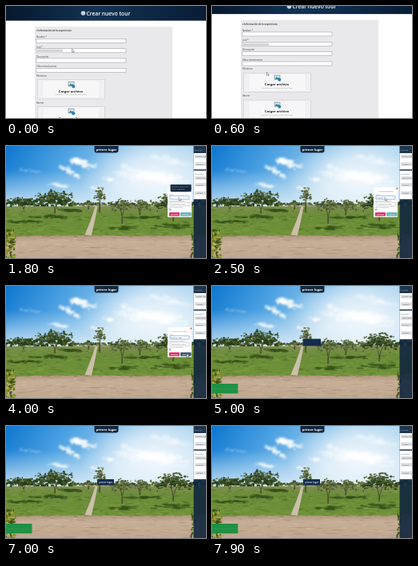
An HTML page that plays this animation: 250x141 px, repeating every 8 s.

```html
<!DOCTYPE html>
<html lang="es">
<head>
<meta charset="utf-8">
<title>Crear nuevo tour</title>
<style>
html, body { margin: 0; width: 100%; height: 100%; overflow: hidden; background: #fff; }
svg { display: block; width: 100vw; height: 100vh; }
text { font-family: "Open Sans", "Noto Sans", sans-serif; }
</style>
</head>
<body>
<svg id="stage" viewBox="0 0 250 141">
  <defs>
    <linearGradient id="bar"><stop offset="0" stop-color="#07182d"/><stop offset=".45" stop-color="#123354"/><stop offset="1" stop-color="#081c35"/></linearGradient>
    <linearGradient id="sky" gradientUnits="userSpaceOnUse" x1="0" y1="0" x2="125" y2="85"><stop offset="0" stop-color="#0d76cf"/><stop offset=".45" stop-color="#4da2e2"/><stop offset="1" stop-color="#a9d2ee"/></linearGradient>
    <linearGradient id="horizon" x1="0" y1="0" x2="0" y2="1"><stop offset="0" stop-color="#e4f1f9" stop-opacity="0"/><stop offset="1" stop-color="#e4f1f9" stop-opacity=".85"/></linearGradient>
    <radialGradient id="glow"><stop offset="0" stop-color="#fff" stop-opacity=".85"/><stop offset=".5" stop-color="#f4f9fd" stop-opacity=".6"/><stop offset="1" stop-color="#e8f3fb" stop-opacity="0"/></radialGradient>
    <linearGradient id="grass" x1="0" y1="0" x2="0" y2="1"><stop offset="0" stop-color="#7d8f50"/><stop offset=".3" stop-color="#6a8c38"/><stop offset="1" stop-color="#6f9238"/></linearGradient>
    <linearGradient id="sand" x1="0" y1="0" x2="0" y2="1"><stop offset="0" stop-color="#ae957b"/><stop offset=".3" stop-color="#c6ae97"/><stop offset="1" stop-color="#c0a78f"/></linearGradient>
    <filter id="wisp" x="-20%" y="-20%" width="140%" height="140%"><feGaussianBlur stdDeviation="1"/></filter>
    <filter id="haze"><feGaussianBlur stdDeviation=".6"/></filter>
    <path id="arrow" d="M0 0v4.2l1-.9.7 1.6.7-.3-.7-1.5h1.3z" fill="#fff" stroke="#222" stroke-width=".35"/>
  </defs>
  <g id="form"></g>
  <g id="tour">
    <g id="photo"></g>
    <g id="side"></g>
    <g id="popup"></g>
    <g id="spot"></g>
    <g id="toast"></g>
    <g id="title"></g>
  </g>
</svg>
<script>
const NS = 'http://www.w3.org/2000/svg';
const $ = id => document.getElementById(id);

function add(parent, tag, attrs, content) {
  const el = document.createElementNS(NS, tag);
  for (const k in attrs) el.setAttribute(k, attrs[k]);
  if (content) el.textContent = content;
  parent.appendChild(el);
  return el;
}
const box = (p, x, y, width, height, fill, more) => add(p, 'rect', { x, y, width, height, fill, ...more });
const label = (p, x, y, size, fill, str, more) => add(p, 'text', { x, y, 'font-size': size, fill, ...more }, str);
const blob = (p, cx, cy, rx, ry, fill, opacity = 1) => add(p, 'ellipse', { cx, cy, rx, ry, fill, opacity });
const MID = { 'text-anchor': 'middle' };
const BOLD = { ...MID, 'font-weight': 700 };

let seed = 17;
const rnd = () => (seed = (seed * 16807) % 2147483647) / 2147483647;
const spread = () => rnd() + rnd() - 1;
const pick = list => list[Math.floor(rnd() * list.length)];
const ramp = (t, a, b) => Math.min(1, Math.max(0, (t - a) / (b - a)));
const ease = u => u * u * (3 - 2 * u);

// Form page
const form = $('form');
box(form, 0, 0, 250, 141, '#fff');
const page = add(form, 'g');
box(page, 0, 0, 250, 18.5, 'url(#bar)');
add(page, 'circle', { cx: 96.5, cy: 9, r: 2.8, fill: '#c5d3e0' });
label(page, 100.5, 11.5, 6.7, '#fff', 'Crear nuevo tour', { 'font-weight': 600 });
box(page, 36, 26, 172, 150, '#e9e9ec');
label(page, 38, 32.2, 2.9, '#333', '▾ Información de la experiencia', { 'font-weight': 600 });

function field(y, name) {
  label(page, 38, y - 2.7, 2.8, '#444', name);
  box(page, 38, y - 1.4, 112, 5, '#fff', { stroke: '#8d8d92', 'stroke-width': .45 });
}
field(42.7, 'Nombre *');
field(55.2, 'Link *');
box(page, 38.3, 54.1, 33, 4.4, '#e2e2e5');
label(page, 39, 57.3, 2.4, '#888', 'tours.ejemplo.mx/recorrido/');
field(67.4, 'Descripción');
field(79.8, 'Video introductorio');

function uploader(y, name) {
  label(page, 38, y - 4, 2.8, '#444', name);
  box(page, 39.5, y, 84, 24.5, '#f1f1f3', { stroke: '#c6c6cb', 'stroke-width': .5 });
  box(page, 46, y + 1.5, 71, 21.5, '#f7f7f8', { stroke: '#dedee2', 'stroke-width': .3 });
  box(page, 78, y + 3, 7, 5.4, '#d6e4ea', { stroke: '#58727f', 'stroke-width': .5 });
  add(page, 'path', { d: `M78.5 ${y + 8}l2.2-3 1.5 1.6 1-1 1.4 2.4z`, fill: '#2b8c83' });
  add(page, 'circle', { cx: 84.3, cy: y + 8.7, r: 2, fill: '#297bb5' });
  label(page, 81, y + 16, 4.2, '#222', 'Cargar archivo', BOLD);
  label(page, 81, y + 19.8, 2.3, '#888', 'Formatos: PNG, JPG, JPEG, Máx: 5MB', MID);
}
uploader(92.5, 'Miniatura');
uploader(126.5, 'Banner');

function button(p, x, y, w, h, fill, str, size) {
  const r = box(p, x, y, w, h, fill, { rx: .6 });
  label(p, x + w / 2, y + h / 2 + size * .36, size, '#fff', str, BOLD);
  return r;
}
button(page, 33, 158.8, 22, 5, '#16708f', 'Guardar', 3);
button(page, 56, 158.8, 24, 5, '#dc2f62', 'Cancelar', 3);
const formCursor = add(form, 'use', { href: '#arrow' });

// Panorama sky
const photo = $('photo');
box(photo, 0, 0, 250, 141, 'url(#sky)');
box(photo, 0, 30, 250, 48, 'url(#horizon)');
add(photo, 'ellipse', { cx: 185, cy: 40, rx: 95, ry: 52, fill: 'url(#glow)' });
const clouds = add(photo, 'g', { filter: 'url(#wisp)' });

// Streaks run down to the right around each centre.
function cloud(x, y, w, h, count, opacity) {
  while (count--) {
    const u = spread();
    blob(clouds, x + u * w, y + u * h * .7 + spread() * h * .6, 1 + rnd() * w * .22, .5 + rnd() * h * .3, '#fff', opacity * (.5 + rnd() * .5));
  }
}
cloud(97, 23, 19, 9, 34, .75);
cloud(78, 31, 14, 7, 22, .65);
cloud(129, 42, 9, 4, 16, .8);
cloud(113, 53, 10, 3, 14, .65);
cloud(66, 49, 18, 4, 18, .55);
cloud(30, 31, 14, 3, 9, .3);
cloud(185, 38, 52, 14, 55, .45);
cloud(205, 18, 34, 8, 22, .3);

// Ground
const GREENS = ['#33451f', '#465a2a', '#5b6f35', '#263a19'];
const PALE = ['#4c5b32', '#657345', '#3a4a27', '#7b8650'];
const far = add(photo, 'g');
for (let x = -2; x < 252; x += 1.5) {
  const h = x < 88 ? 8 : x > 165 ? 7 : 4;
  blob(far, x, 76 - rnd() * h, 1 + rnd() * 2, .8 + rnd() * h * .28, pick(GREENS));
}
box(photo, 0, 76, 250, 39, 'url(#grass)');
box(photo, 84, 74.6, 88, 1.6, '#b9b397', { opacity: .7 });
const lawn = add(photo, 'g', { filter: 'url(#haze)' });
for (let i = 0; i < 420; i++) {
  const depth = rnd();
  blob(lawn, rnd() * 240, 77 + depth * 36, 1 + rnd() * (2 + depth * 4), .3 + rnd() * .7,
    pick(['#8aa04a', '#4b6d25', '#789a3f', '#597a2d']), .5);
}
[[55, 89, 26, 2.6], [22, 95, 24, 2.4], [145, 103, 19, 2.6], [207, 101, 26, 3.6], [172, 90, 23, 1.8], [80, 81, 20, 1.4]]
  .forEach(([x, y, w, h]) => {
    for (let i = 0; i < 26; i++) blob(lawn, x + spread() * w, y + spread() * h, 2 + rnd() * 4, .5 + rnd(), '#35511c', .55);
  });
add(photo, 'path', { d: 'M111.5 76h3Q112 91 106.5 114h-9Q107 92 111.5 76z', fill: '#cbbfaa' });
add(photo, 'path', { d: 'M0 114Q60 112 125 112.8T250 111.5V141H0z', fill: 'url(#sand)' });
const dirt = add(photo, 'g', { filter: 'url(#haze)' });
for (let i = 0; i < 60; i++)
  blob(dirt, rnd() * 240, 112 + rnd() * 2, 1 + rnd() * 3, .4 + rnd() * .5, pick(['#7d8245', '#a48c6f']), .6);
for (let i = 0; i < 180; i++)
  blob(dirt, rnd() * 250, 115 + rnd() * 26, 1 + rnd() * 7, .3 + rnd() * .5, pick(['#a48b72', '#d6c3ae', '#b59d84']), .45);

// Leaves get darker toward the underside of each crown.
function tree(x, y, w, h, base, count, tones) {
  add(photo, 'path', {
    d: `M${x} ${base}Q${x + 1} ${y + h} ${x - w * .35} ${y}M${x} ${base}Q${x} ${y + h} ${x + w * .4} ${y}`,
    fill: 'none', stroke: '#463c2c', 'stroke-width': .8
  });
  while (count--) {
    const u = spread(), v = spread();
    const tone = v > .25 ? tones[rnd() < .5 ? 0 : 3] : pick(tones);
    blob(photo, x + u * w, y + v * h + u * u * h * .5, .6 + rnd() * 1.6, .4 + rnd(), tone, .9);
  }
}
tree(22, 70, 21, 6, 80, 110, GREENS);
tree(61, 64, 25, 10, 85, 220, GREENS);
tree(103, 72, 7, 4, 80, 26, PALE);
tree(117, 60, 7, 9, 84, 46, PALE);
tree(145, 74, 14, 8, 98, 115, PALE);
tree(167, 74, 14, 7, 87, 85, PALE);
tree(209, 69, 25, 11, 95, 240, GREENS);
for (let i = 0; i < 90; i++)
  blob(photo, rnd() * 13 - 2, 106 + rnd() * 36, .6 + rnd() * 2, .6 + rnd() * 1.4, pick(['#6c7f22', '#a3a53c', '#3f531b']));
for (let i = 0; i < 24; i++)
  blob(photo, 231 + rnd() * 5, 106 + rnd() * 35, .6 + rnd(), .8 + rnd() * 2, pick(['#61712d', '#8c8b50', '#425824']));

// Side panel
const side = $('side');
box(side, 234.5, 0, 15.5, 141, '#10263d', { opacity: .9 });
box(side, 234.5, 9, 15.5, 20.5, '#fff');
box(side, 234.5, 31, 15.5, 36, '#fff');
[[11, 'primer lugar'], [20.5, 'Agregar'], [38.3, 'Información'], [46.5, 'Enlaces'], [57, 'Agregar']].forEach(([y, str]) => {
  box(side, 236, y, 16, 4.4, '#dcdfe2', { rx: 1 });
  label(side, 238, y + 3.1, 2.3, '#444', str);
});
label(side, 236, 6, 2.5, '#b8c3ce', 'Escenas');
label(side, 236, 36, 2.4, '#555', 'Elementos');

// New element popup
const popup = $('popup');
box(popup, 202, 52, 30, 37.5, '#fff', { rx: .6 });
label(popup, 217, 57.6, 2.5, '#8c5560', 'Nuevo elemento', MID);
add(popup, 'circle', { cx: 231.2, cy: 53.6, r: 1, fill: '#d2553f' });
label(popup, 204, 61.6, 2, '#666', 'Título');
box(popup, 205, 62.8, 24, 4.3, '#fff', { stroke: '#4b8fcf', 'stroke-width': .6, rx: .5 });
const typed = label(popup, 206.5, 66, 2.4, '#333', '');
label(popup, 204, 70, 2, '#666', 'Seleccione el destino');
box(popup, 205, 71, 24, 4.3, '#fff', { stroke: '#8d969f', 'stroke-width': .4 });
label(popup, 206.5, 74.1, 2.3, '#555', 'Seleccionar lugar');
label(popup, 204, 78.1, 2, '#666', 'Abrir en otra vista');
box(popup, 204.3, 79.2, 1.8, 1.8, '#fff', { stroke: '#667', 'stroke-width': .4 });
button(popup, 204, 83.4, 13, 4.8, '#df3269', 'Cancelar', 2.2);
const save = button(popup, 218, 83.4, 13.5, 4.8, '#65b3bf', 'Guardar', 2.2);
const hint = add(popup, 'g');
box(hint, 205.5, 48.5, 26, 9, '#14253b', { rx: .7 });
label(hint, 207, 52.2, 2.2, '#d5dce4', 'Escribe el título de tu');
label(hint, 207, 55.4, 2.2, '#d5dce4', 'nuevo elemento');
const popCursor = add(popup, 'use', { href: '#arrow' });

// Hotspot, notice and heading
const spot = $('spot');
const tag = box(spot, 0, 0, 0, 0, '#142b4b', { rx: .5 });
const tagText = label(spot, 124.7, 71.8, 2.7, '#b5c0ce', 'primer lugar', BOLD);
const toast = $('toast');
box(toast, 0, 123, 32.5, 12.3, '#1f9144');
label(toast, 2, 130, 2.2, '#4aa968', 'Elemento guardado con éxito');
const title = $('title');
add(title, 'path', { d: 'M110.5 0h30v5.4q0 3-3 3h-24q-3 0-3-3z', fill: '#122840' });
label(title, 125.5, 5.6, 4.1, '#fff', 'primer lugar', BOLD);

const show = (el, on) => el.setAttribute('visibility', on ? 'visible' : 'hidden');
const place = (el, x, y) => el.setAttribute('transform', `translate(${x} ${y})`);

function draw(t) {
  const scroll = ease(ramp(t, 400, 900));
  place(page, 0, -23.8 * scroll);
  place(formCursor, 82.5 - 40 * scroll, 54 + 83 * scroll);
  show(formCursor, t < 1000);
  $('tour').setAttribute('opacity', ramp(t, 900, 1500));

  const open = t < 4600;
  show(popup, open);
  show(hint, open && t < 2100);
  typed.textContent = 'primer lugar'.slice(0, Math.floor(12 * ramp(t, 2100, 2800)));
  const reach = ease(ramp(t, 3200, 3900));
  place(popCursor, 216 + 10 * reach, 64.5 + 21 * reach);
  show(popCursor, open);
  save.setAttribute('fill', t >= 3800 ? '#3b5870' : '#65b3bf');

  show(toast, t >= 4900);
  show(spot, t >= 4900);
  const named = t >= 6900;
  const [x, y, w, h] = named ? [114, 67, 21, 7.6] : [113.5, 66.5, 22.5, 9];
  Object.entries({ x, y, width: w, height: h }).forEach(([k, v]) => tag.setAttribute(k, v));
  show(tagText, named);
}

const start = performance.now();
function tick(now) {
  const t = Math.max(0, now - start) % 8000;
  draw(Math.floor(t / 100) * 100);
  requestAnimationFrame(tick);
}
draw(0);
requestAnimationFrame(tick);
</script>
</body>
</html>
```
